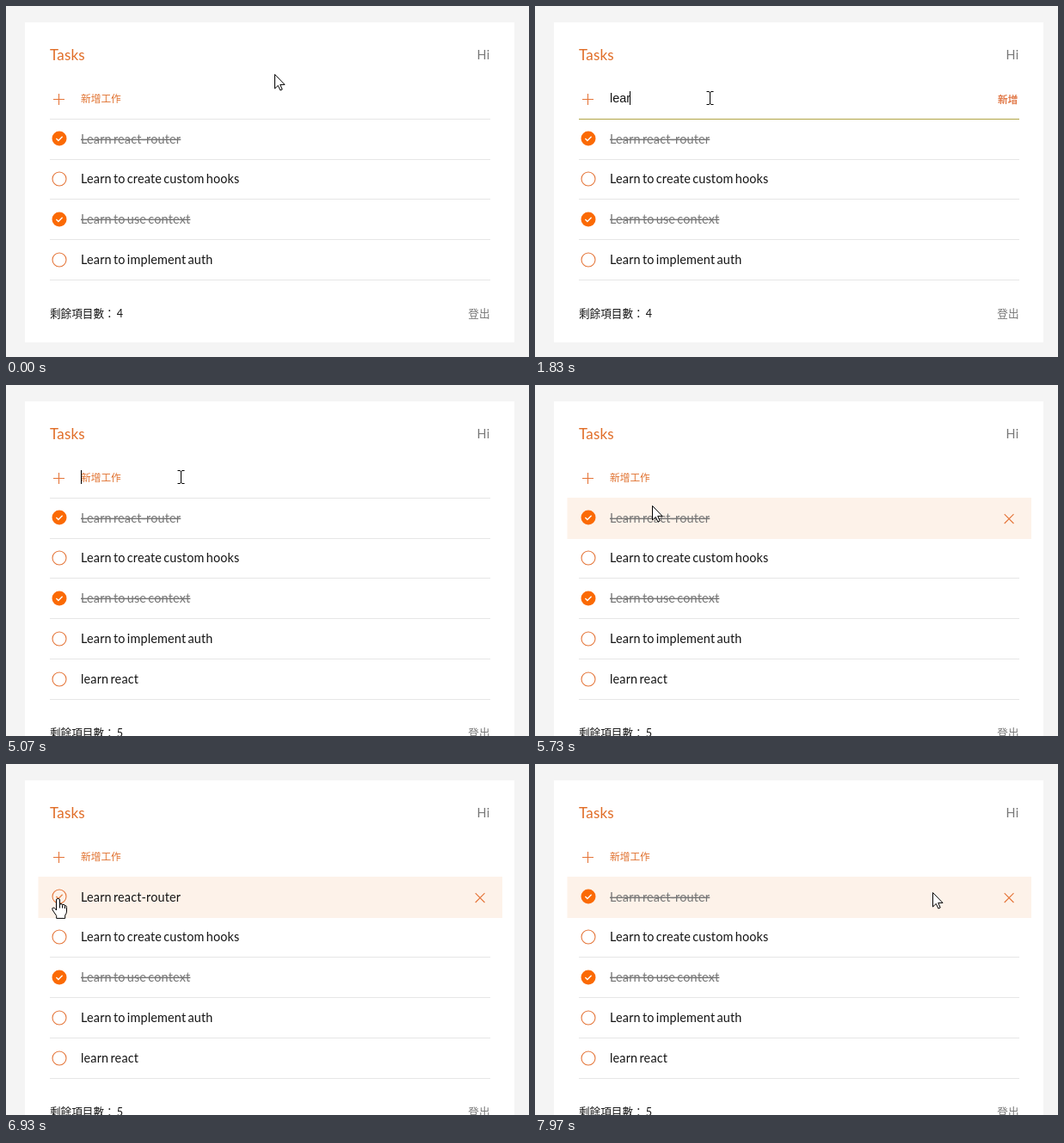
An HTML page that plays this animation: 608x408 px, repeating every 8 s.

```html
<!DOCTYPE html>
<html lang="zh-Hant">
<head>
<meta charset="utf-8">
<title>Tasks</title>
<style>
html, body { margin: 0; width: 100%; height: 100%; overflow: hidden; background: #f4f4f4; }
svg { display: block; }
text { font: 14.4px Lato, "Noto Sans CJK TC", "Noto Sans CJK", sans-serif; letter-spacing: .18px; word-spacing: -1.7px; fill: #141414; }
.title { font-size: 17px; fill: #e06c26; }
.gray { fill: #777; }
.done { fill: #777; text-decoration: line-through; }
.hint { font-size: 11.7px; font-weight: 300; letter-spacing: 0; fill: #e0712f; }
.add { font-size: 11.7px; font-weight: 700; letter-spacing: 0; fill: #e27b4b; }
.foot { font-size: 12.6px; letter-spacing: 0; word-spacing: -1px; }
.thin { font-weight: 300; }
.input { font: 14.4px "Liberation Sans", Arial, sans-serif; letter-spacing: 0; word-spacing: 0; }
.end { text-anchor: end; }
.line { fill: none; stroke: #e5763a; stroke-width: 1.1; }
.cursor { fill: #fff; stroke: #000; stroke-linejoin: round; }
</style>
</head>
<body>
<svg id="stage" width="608" height="408" viewBox="0 0 608 408"></svg>
<script>
const LOOP = 8000, SUBMIT = 4670, ADDED = 4700;
const stage = document.getElementById('stage');
const ruler = document.createElement('canvas').getContext('2d');
ruler.font = '14.4px "Liberation Sans", Arial, sans-serif';

const tasks = ['Learn react-router', 'Learn to create custom hooks', 'Learn to use context',
  'Learn to implement auth', 'learn react'];
// [time, letters typed so far]
const typing = [[0, 0], [1170, 1], [1330, 2], [1830, 4], [2070, 5], [2430, 6], [2970, 7],
  [3100, 8], [3230, 9], [3430, 10], [3670, 11], [SUBMIT, 0]];
// [time, x, y] of the pointer
const path = [[0, 312, 79], [30, 312, 79], [470, 203, 107], [5470, 203, 107], [5730, 136, 140],
  [6100, 67, 158], [6270, 63, 162], [6500, 63, 162], [6750, 63, 168], [7030, 60, 150],
  [7200, 60, 150], [7400, 60, 146], [7600, 60, 146], [7970, 462, 149], [LOOP, 462, 149]];

const shapes = {
  arrow: '<path class="cursor" d="M.5.5V17L4.3 13.4 6.9 19 9.2 18 6.7 12.4H12Z"/>',
  beam: '<path d="M-3.5-7.5H-1L.5-6.5 2-7.5H4.5M.5-6.5V6.5M-3.5 7.5H-1L.5 6.5 2 7.5H4.5" fill="none" stroke="#000"/>',
  hand: '<path class="cursor" d="M-2.5 2Q-2.5.5-.5.5T1.5 2V8Q1.5 6.5 3 6.5T4.5 8.3Q4.7 7.3 6 7.3T7.5 9.3Q7.7 8.5 8.6 8.7T9.5 10.5V15Q9.5 18 7.7 20V23.4H-2.3V20.5L-6.7 14Q-8 11.4-6.3 11Q-4.9 10.7-3.5 12.6L-2.5 14ZM4.5 8.3V11.5M7.5 9.3V12M1.5 8V11.5"/>'
};

const within = (t, from, to) => t >= from && t < to;
const ramp = (t, from, to) => Math.min(1, Math.max(0, (t - from) / (to - from)));
const text = (x, y, cls, str) => `<text x="${x}" y="${y}" class="${cls}">${str}</text>`;
const rect = (x, y, w, h, fill) => `<rect x="${x}" y="${y}" width="${w}" height="${h}" fill="${fill}"/>`;
const rowLine = i => Math.round(130.8 + 46.8 * i);

function pointer(t) {
  const i = path.findIndex(p => p[0] > t);
  const [t0, x0, y0] = path[i - 1], [t1, x1, y1] = path[i];
  const k = (t - t0) / (t1 - t0);
  const x = Math.round(x0 + (x1 - x0) * k), y = Math.round(y0 + (y1 - y0) * k);
  const kind = y < 83 ? 'arrow' : y < 131 ? 'beam' : x < 76 ? 'hand' : 'arrow';
  return { x, y, kind };
}

function row(i, done, hovered) {
  const y = Math.round(154.4 + 46.8 * i);
  const tick = color => `<path d="M58.4 ${y}l2.5 2.5 4.7-4.8" fill="none" stroke="${color}" stroke-width="1.3"/>`;
  const mark = done
    ? `<circle cx="62" cy="${y}" r="8.5" fill="#fb6a04"/>` + tick('#fff')
    : `<circle cx="62" cy="${y}" r="8" class="line"/>` + (hovered ? tick('#e88448') : '');
  return mark + text(87, Math.round(159.5 + 46.8 * i), done ? 'done' : '', tasks[i]);
}

function inputRow(t) {
  const count = typing.filter(k => k[0] <= t).pop()[1];
  const typed = tasks[4].slice(0, count);
  const active = ramp(t, 1170, 1430) * (1 - ramp(t, SUBMIT, SUBMIT + 100));
  const caret = within(t, 900, 4200) || within(t, SUBMIT, 5270);
  return '<path class="line" d="M55 108.5H68M61.5 102V115"/>'
    + (count ? text(87, 112, 'input', typed) : text(87, 112, 'hint', '新增工作'))
    + (caret ? rect(Math.floor(87 + ruler.measureText(typed).width), 99, 1, 16, '#000') : '')
    + `<g opacity="${active}">${rect(51, 131, 512, 1, '#b0a545')}${text(561.5, 112.5, 'add end', '新增')}</g>`;
}

function render(t) {
  const total = t < ADDED ? 4 : 5, shift = t < ADDED ? 0 : 47;
  const cur = pointer(t);
  const hover = ramp(t, 5655, 5715);
  const firstDone = !within(t, 6330, 7500);
  let out = rect(22, 19, 569, 372 + shift, '#fff')
    + text(51, 63, 'title', 'Tasks') + text(562.3, 62, 'gray end', 'Hi');
  for (let i = 0; i <= total; i++) out += rect(51, rowLine(i), 512, 1, '#e6e6e6');
  out += inputRow(t)
    + `<g opacity="${hover}">${rect(37.5, 131, 539.5, 48, '#fdf2e9')}`
    + '<path class="line" d="M545.7 150.2l10.8 10.8M556.5 150.2l-10.8 10.8"/></g>';
  for (let i = 0; i < total; i++)
    out += row(i, i === 0 ? firstDone : i === 2, i === 0 && cur.kind === 'hand');
  out += text(51, 362 + shift, 'foot', '剩餘項目數： ' + total)
    + text(562.5, 362 + shift, 'foot gray thin end', '登出')
    + `<g transform="translate(${cur.x} ${cur.y})">${shapes[cur.kind]}</g>`;
  stage.innerHTML = out;
}

const start = performance.now();
function frame() {
  render((performance.now() - start) % LOOP);
  requestAnimationFrame(frame);
}
frame();
</script>
</body>
</html>
```
